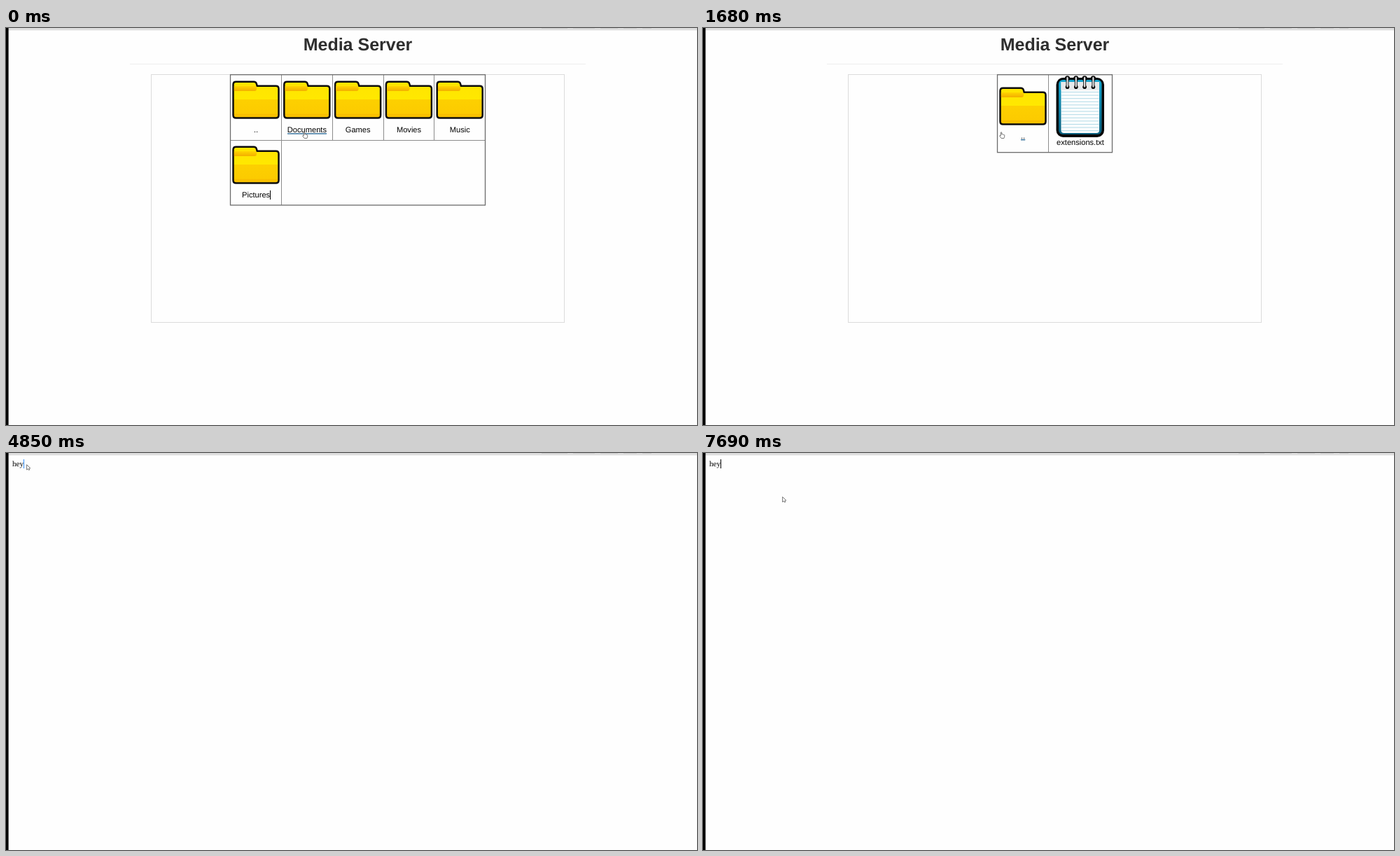
Recreate the animation shown at these times as an HTML page. Size 987 by 567 pixels, loop 8000 ms.

```html
<!DOCTYPE html>
<html lang="en">
<head>
<meta charset="utf-8">
<title>Media Server</title>
<style>
  html, body { margin: 0; width: 100%; height: 100%; overflow: hidden; background: #fefefe; }
  svg { display: block; width: 987px; height: 567px; }
  text { font: 11.1px "Liberation Sans", Arial, sans-serif; text-rendering: geometricPrecision; }
  .title { font-size: 25px; font-weight: bold; fill: #2e2e2e; }
  .plain { font-family: "Liberation Serif", "Times New Roman", serif; }
  .mid { text-anchor: middle; }
  .crisp { shape-rendering: crispEdges; }
</style>
</head>
<body>
<svg viewBox="0 0 987 567">
  <defs>
    <linearGradient id="tab" x2="0" y2="1">
      <stop offset="0" stop-color="#ffd400"/><stop offset="1" stop-color="#f3ae00"/>
    </linearGradient>
    <linearGradient id="body" x2="0" y2="1">
      <stop offset="0" stop-color="#ffe400"/><stop offset=".48" stop-color="#ffe800"/>
      <stop offset=".49" stop-color="#fdd000"/><stop offset=".88" stop-color="#fccb00"/>
      <stop offset=".9" stop-color="#f8bd00"/><stop offset="1" stop-color="#fbc800"/>
    </linearGradient>
    <linearGradient id="cover" x2="0" y2="1">
      <stop offset="0" stop-color="#16a6cf"/><stop offset="1" stop-color="#0a5f7e"/>
    </linearGradient>
    <g id="folder">
      <path d="M5.5 1.7H31q3 0 3.800 2.800l.9 3.200H62.500q4 0 4 4V49.500q0 4-4 4H5.500q-4 0-4-4V5.700q0-4 4-4z"
        fill="url(#body)" stroke="#0c0c0c" stroke-width="2.5"/>
      <path d="M2.800 8H33.500q1.500 0 1.500 2v1.500q0 3.500-3 3.500H2.800z" fill="url(#tab)"/>
    </g>
    <g id="pad">
      <rect y="3" width="68.500" height="85" rx="10" fill="#060606"/>
      <rect x="3.500" y="6" width="61.500" height="78" rx="6" fill="url(#cover)"/>
      <path d="M7 9H61.500V78q0 4-4 4H11q-4 0-4-4z" fill="#fdfefe"/>
      <path d="M7 9H61.500V21H7z" fill="#e6e9eb"/>
      <g id="rules" stroke="#b0d9e6"></g>
      <g id="rings" stroke-linecap="round"></g>
    </g>
    <path id="hand" transform="translate(-4)" fill="#fff" stroke="#555" stroke-width=".8" stroke-linejoin="round"
      d="M2.300 5.800V1.200Q3.100 0 3.800 1.200V4Q4.700 3.200 5.200 4.100Q6.100 3.600 6.500 4.500Q7.500 4.200 7.700 5.200V7.200L6.800 9.600H3.200L.6 6.200Q.6 4.900 2.300 5.800z"/>
    <path id="arrow" fill="#fff" stroke="#555" stroke-width=".8" stroke-linejoin="round"
      d="M.6 .7V8L2.400 6.600 3.600 8.500 4.700 8 3.800 6.100 5.800 5.700z"/>
  </defs>

  <rect width="987" height="567" fill="#fefefe"/>
  <g id="edge">
    <rect width="987" height="1" fill="#c6c6c6"/>
    <rect y="2" width="987" height="1" fill="#c4c4c4"/>
    <rect width="3.600" height="567"/>
  </g>

  <g id="site">
    <text class="title mid" x="502.500" y="32">Media Server</text>
    <rect x="177" y="51" width="651" height="1" fill="#eee"/>
    <rect x="207.500" y="66.500" width="590" height="354" fill="none" stroke="#dcdcdc"/>
  </g>
  <g id="home"></g>
  <g id="docs"></g>
  <g id="note">
    <rect id="mark" y="9" height="13" fill="#3390ff" class="crisp"/>
    <text id="word" class="plain" x="9" y="19">hey</text>
  </g>

  <rect id="caret" width="1" height="13" class="crisp"/>
  <use id="cursor"/>
</svg>

<script>
const $ = id => document.getElementById(id);

function set(el, attrs) {
  for (const k in attrs) el.setAttribute(k, attrs[k]);
  return el;
}

function add(parent, tag, attrs, text = "") {
  const el = set(document.createElementNS("http://www.w3.org/2000/svg", tag), attrs);
  el.textContent = text;
  return parent.appendChild(el);
}

const label = (g, text, x, y) => add(g, "text", { class: "mid", x, y }, text);
const icon = (g, name, x, y) => add(g, "use", { href: "#" + name, x, y });
const divider = (g, d) => add(g, "path", { d, stroke: "#8c8c8c", class: "crisp" });
const border = (g, x, width, height) =>
  add(g, "rect", { x, y: 66.7, width, height, fill: "none", stroke: "#6c6c6c", "stroke-width": 1.3 });
const underline = (g, x, y, width) =>
  add(g, "rect", { x, y, width, height: 1.3, fill: "#1d6090" });
const show = (el, on) => set(el, { visibility: on ? "visible" : "hidden" });

// Cut-off strip along the upper edge
for (let x = 765, w = 37; w > 10; x += w + 8, w -= 6)
  add($("edge"), "rect", { x, width: w, height: 1, fill: "#b4b4b4" });

for (let i = 0; i < 13; i++)
  add($("rules"), "path", { d: `M7.5 ${23.5 + i * 4.6}h53.5` });

for (let i = 0; i < 4; i++) {
  const x = 16 + i * 12.3, g = $("rings"), d = `M${x} 3v12.5`;
  add(g, "circle", { cx: x, cy: 3.8, r: 3.6 });
  add(g, "circle", { cx: x, cy: 16.2, r: 2.8 });
  add(g, "path", { d, stroke: "#222", "stroke-width": 4 });
  add(g, "path", { d, stroke: "#e4e7e9", "stroke-width": 2 });
}

const CELL = 72.8, ROW = 93;

const home = $("home");
divider(home, "M321 160.500H685");
["..", "Documents", "Games", "Movies", "Music", "Pictures"].forEach((name, i) => {
  const col = i % 5, row = Math.floor(i / 5);
  const x = 320.7 + col * CELL, y = 67 + row * ROW;
  if (col) divider(home, `M${x} ${y}v${ROW}`);
  icon(home, "folder", x + 2.3, y + 8);
  label(home, name, x + CELL / 2, y + 82.2);
});
divider(home, `M${320.7 + CELL} 160v${ROW}`);
border(home, 320.5, 364, 186.3);
underline(home, 402, 150.3, 56);

const docs = $("docs");
divider(docs, "M493.500 67V178");
icon(docs, "folder", 423, 84);
icon(docs, "pad", 504.5, 68);
label(docs, "..", 457, 158);
label(docs, "extensions.txt", 539, 167);
border(docs, 420.5, 164, 111);
const upLine = underline(docs, 454, 159, 6.2);
const fileLine = underline(docs, 505, 168.3, 68);

const LOOP = 8000, TICK = 143;
const OPEN_DOCS = 1680, HOVER_FILE = 2720, OPEN_FILE = 3690;
const DRAG = 4850, DRAG_END = 5130, DESELECT = 5700;

// The pointer moves in ticks, easing out towards each stop
const legs = [
  { end: 0, ticks: 1, x: 427, y: 148 },
  { end: HOVER_FILE, ticks: 4, x: 517, y: 165 },
  { end: 3970, ticks: 1, x: 419, y: 136 },
  { end: 4400, ticks: 2, x: 3, y: 29 },
  { end: 4700, ticks: 2, x: 29, y: 16 },
  { end: DRAG_END, ticks: 2, x: 3, y: 18 },
  { end: 5400, ticks: 2, x: 45, y: 29 },
  { end: 5980, ticks: 2, x: 22, y: 4 },
  { end: 6440, ticks: 3, x: 24, y: -20 },
  { end: 7390, ticks: 2, x: 113, y: 62 },
];

function pointer(t) {
  let { x, y } = legs[0];
  for (const leg of legs) {
    const step = Math.floor((t - leg.end) / TICK) + leg.ticks;
    if (step <= 0) break;
    const k = 1 - (1 - Math.min(1, step / leg.ticks)) ** 1.6;
    x += (leg.x - x) * k;
    y += (leg.y - y) * k;
  }
  return { x: Math.round(x), y: Math.round(y) };
}

// Each click restarts the caret's blink
function blink(t) {
  const click = [0, 1520, DESELECT].findLast(c => c <= t);
  return (t - click) % 980 < 430;
}

function draw(t) {
  const inHome = t < OPEN_DOCS, inNote = t >= OPEN_FILE;
  const selecting = t >= DRAG && t < DESELECT;
  show($("home"), inHome);
  show($("docs"), !inHome && !inNote);
  show($("site"), !inNote);
  show($("note"), inNote);
  show(upLine, !inHome && t < HOVER_FILE);
  show(fileLine, t >= HOVER_FILE && !inNote);

  show($("caret"), blink(t) && (inHome || t >= DESELECT));
  set($("caret"), inNote ? { x: 25, y: 9 } : { x: 377, y: 232 });

  const left = Math.max(9, Math.min(25, pointer(Math.min(t, DRAG_END)).x));
  show($("mark"), selecting);
  set($("mark"), { x: left, width: 26 - left });
  set($("word"), { fill: selecting && left === 9 ? "#fff" : "#000" });

  set($("cursor"), { href: inNote ? "#arrow" : "#hand", ...pointer(t) });
}

const start = performance.now();
function tick() {
  draw((performance.now() - start) % LOOP);
  requestAnimationFrame(tick);
}
draw(0);
requestAnimationFrame(tick);
</script>
</body>
</html>
```
